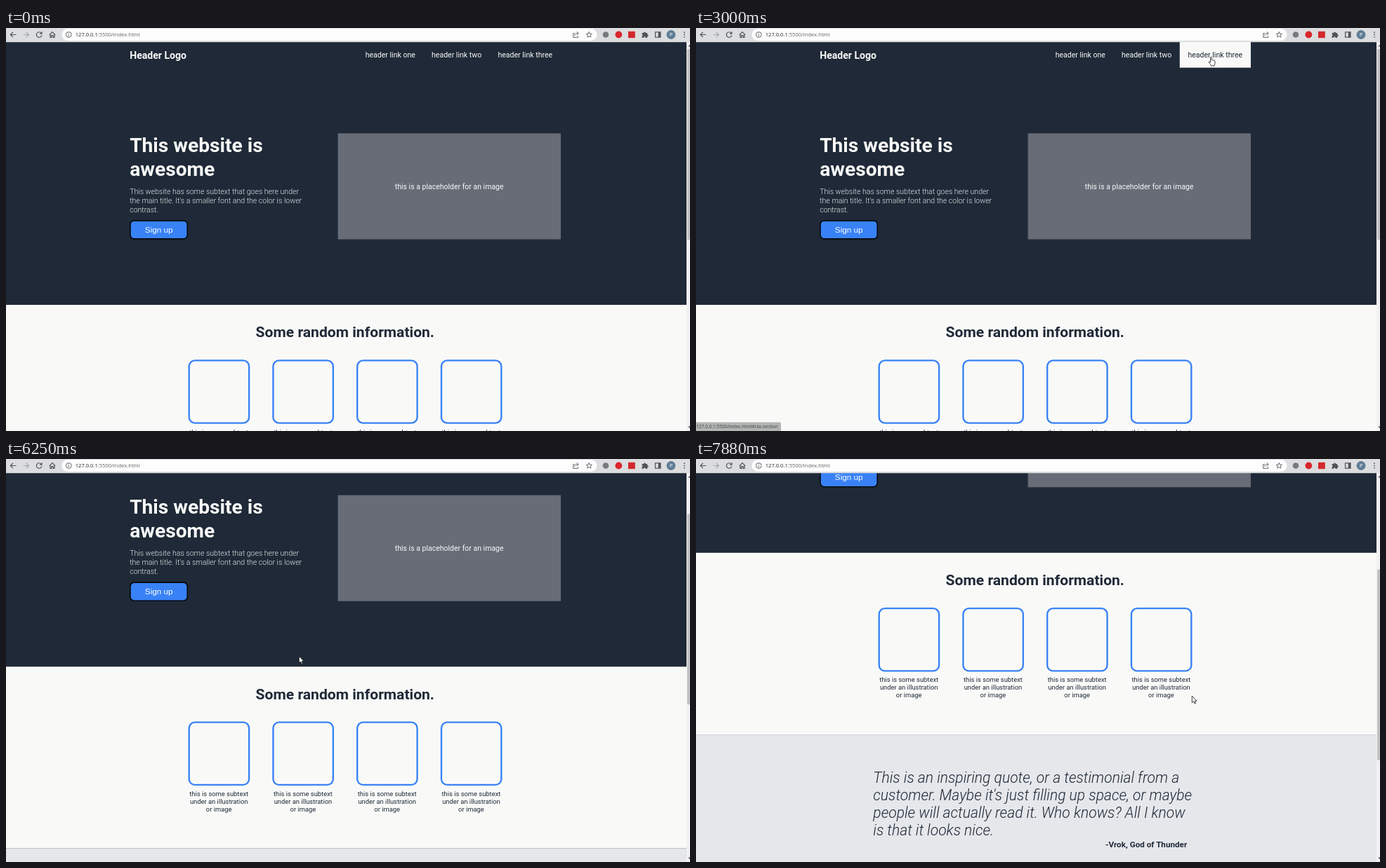
An HTML page for the animation above (8 s loop, 974x575 px).

```html
<!DOCTYPE html>
<html lang="en">
<head>
<meta charset="utf-8">
<title>Landing page demo</title>
<style>
  html, body { margin: 0; width: 100%; height: 100%; overflow: hidden; background: #1f2937; }
  svg { display: block; width: 974px; height: 575px; font-family: Roboto, sans-serif; }
  .ui { font-family: "Noto Sans", "Open Sans", sans-serif; }
  .logo { font-size: 14.07px; font-weight: 700; fill: #f9faf8; }
  .link text { font-size: 10.55px; fill: #f9faf8; }
  .link rect { fill: none; }
  .link.on text { fill: #1f2937; }
  .link.on rect { fill: #f9faf8; }
  .title { font-size: 28.15px; font-weight: 700; fill: #f9faf8; }
  .sub { font-size: 10.55px; font-weight: 300; fill: #e5e7eb; }
  .alt { font-size: 10.5px; fill: #f9faf8; text-anchor: middle; }
  .button { font: 11.72px "Liberation Sans", Arial, sans-serif; fill: #fff; text-anchor: middle; }
  .heading { font-size: 21.1px; font-weight: 700; fill: #1f2937; text-anchor: middle; }
  .caption { font-size: 9.38px; fill: #1f2937; text-anchor: middle; }
  .quote { font-size: 21.1px; font-weight: 300; font-style: italic; fill: #1f2937; }
  .author { font-size: 11.7px; font-weight: 700; fill: #1f2937; text-anchor: end; }
  .icon { fill: none; stroke: #505357; stroke-width: 1.2; }
</style>
</head>
<body>
<svg viewBox="0 0 974 575">
  <defs>
    <g id="card">
      <rect x="260.7" y="474.4" width="85.4" height="89.2" rx="8.2" fill="none" stroke="#3882f6" stroke-width="2.35"/>
      <g class="caption">
        <text x="303.2" y="579.6">this is some subtext</text>
        <text x="303.2" y="590.6">under an illustration</text>
        <text x="303.2" y="601.6">or image</text>
      </g>
    </g>
  </defs>

  <g id="page">
    <rect y="20" width="969" height="375" fill="#1f2937"/>
    <text class="logo" x="176.2" y="43.8">Header Logo</text>
    <g class="link"><rect x="500" y="20" width="94.7" height="36.6"/><text x="511.7" y="42">header link one</text></g>
    <g class="link"><rect x="594.4" y="20" width="94.6" height="36.6"/><text x="606" y="42">header link two</text></g>
    <g class="link"><rect x="688.8" y="20" width="101.2" height="36.6"/><text x="700.4" y="42">header link three</text></g>

    <g class="title"><text x="176.2" y="177.2">This website is</text><text x="176.2" y="211">awesome</text></g>
    <g class="sub">
      <text x="176.2" y="236.8">This website has some subtext that goes here under</text>
      <text x="176.2" y="249.7">the main title. It's a smaller font and the color is lower</text>
      <text x="176.2" y="262.5">contrast.</text>
    </g>
    <rect x="177" y="275" width="81.2" height="25.8" rx="5.5" fill="#3882f6" stroke="#000" stroke-width="1.4"/>
    <text class="button" x="217.7" y="291.6">Sign up</text>
    <rect x="472.6" y="150.3" width="317.4" height="151.2" fill="#676c77"/>
    <text class="alt" x="631.2" y="229.6">this is a placeholder for an image</text>

    <rect y="395" width="969" height="259.3" fill="#f9faf8"/>
    <text class="heading" x="482.8" y="441.4">Some random information.</text>
    <use href="#card"/>
    <use href="#card" x="119.75"/>
    <use href="#card" x="239.5"/>
    <use href="#card" x="359.25"/>

    <rect y="654.3" width="969" height="260" fill="#e5e7eb"/>
    <g class="quote">
      <text x="252.3" y="723.4">This is an inspiring quote, or a testimonial from a</text>
      <text x="252.3" y="748.5">customer. Maybe it's just filling up space, or maybe</text>
      <text x="252.3" y="773.6">people will actually read it. Who knows? All I know</text>
      <text x="252.3" y="798.7">is that it looks nice.</text>
    </g>
    <text class="author" x="699.2" y="815.3">-Vrok, God of Thunder</text>
  </g>

  <rect x="969" y="20" width="5" height="555" fill="#f1f1f1"/>
  <rect id="thumb" x="970" y="30" width="4" height="272" fill="#c1c1c1"/>
  <path d="M971.2 26.5L973.6 24 974 24.4V26.5ZM971.2 568.5L973.6 571 974 570.6V568.5Z" fill="#505050"/>

  <g id="status" class="ui">
    <path id="bubble" fill="#b3b4b4"/>
    <text id="address" x="0.3" y="571.2" font-size="6.5" fill="#45484b"></text>
  </g>

  <!-- browser toolbar -->
  <rect width="974" height="20.2" fill="#dcddde"/>
  <rect x="79.5" y="1" width="762" height="17" rx="8.5" fill="#fdfdfd"/>
  <text class="ui" x="98.8" y="12.4" font-size="7.55" fill="#303236">127.0.0.1<tspan fill="#6a6d71">:5500/index.html</tspan></text>
  <g class="icon">
    <path d="M14.3 9.5H6.5M10 5.8L6.3 9.5 10 13.2"/>
    <path d="M24.5 9.5H32.5M28.8 5.8L32.5 9.5 28.8 13.2" stroke="#a2a4a7"/>
    <path d="M50.2 7.2A3.8 3.8 0 1 0 50.9 10.4M51 5.2V8.2H48"/>
    <path d="M61.8 9.8L66 5.6 70.2 9.8M63 9V13.4H64.9V10.6H67.1V13.4H69V9"/>
    <g stroke-width=".9">
      <circle cx="89.3" cy="9.5" r="3.9"/>
      <path d="M89.3 8.9V11.8M89.3 7V8"/>
      <path d="M810 7.6H807.8V13.4H814.6V11.2M809.8 11C810 8.6 811.6 7.6 814 7.6M812.6 5.4L815.4 7.7 812.6 10"/>
      <path d="M830.3 5.4L831.5 8.2 834.3 8.4 832.2 10.3 832.8 13.1 830.3 11.6 827.8 13.1 828.4 10.3 826.3 8.4 829.1 8.2Z"/>
    </g>
    <rect x="924.6" y="5.8" width="7.4" height="7.4"/>
  </g>
  <circle cx="854" cy="9.5" r="4.3" fill="#77797b"/>
  <circle cx="872.4" cy="9.5" r="4.9" fill="#d8262c"/>
  <rect x="886" y="4.8" width="9.8" height="9.4" fill="#d2282d"/>
  <path d="M905.6 7H908A1.5 1.5 0 0 1 911 7H913.2V9A1.5 1.5 0 0 1 913.2 12V14H910.6A1.4 1.4 0 0 0 907.8 14H905.6V11.4A1.4 1.4 0 0 0 905.6 8.8Z" fill="#505357"/>
  <path d="M928.8 6H932V13H928.8Z" fill="#505357"/>
  <circle cx="947" cy="9.5" r="6.4" fill="#5f7d95"/>
  <text class="ui" x="947" y="12" font-size="7" text-anchor="middle" fill="#fff">P</text>
  <g fill="#505357"><circle cx="966" cy="6.2" r=".9"/><circle cx="966" cy="9.5" r=".9"/><circle cx="966" cy="12.8" r=".9"/></g>

  <g id="cursor" fill="#fff" stroke="#111" stroke-width=".8" stroke-linejoin="round">
    <path id="arrow" d="M0 0V9.8L2.3 7.8 4 11.3 5.4 10.7 3.9 7.3H6.8Z"/>
    <path id="hand" d="M3 1.4A.9.9 0 0 1 4.8 1.4V5.2C5 4.6 6.4 4.6 6.5 5.4 6.8 4.8 8 5 8.1 5.8 8.5 5.3 9.5 5.6 9.5 6.5V9.5C9.5 11 8.6 11.6 8.6 13.2H4C4 11.8 1.8 9.8.9 8.2.5 7.3 1.5 6.8 2.2 7.5L3 8.4Z"/>
  </g>
</svg>
<script>
  const LOOP = 8000;
  const sections = ['info', 'quote', 'cta'];
  const bubbleWidths = [124, 130, 121];

  // time, cursor x, cursor y, shape, hovered link, scroll
  const poses = [
    [0, 0, 0, ''],
    [200, 793, 102, 'arrow'],
    [400, 755, 118, 'arrow'],
    [600, 694, 126, 'arrow'],
    [800, 638, 121, 'arrow'],
    [1000, 595, 111, 'arrow'],
    [1200, 558, 94, 'arrow'],
    [1390, 546, 44, 'hand', 0],
    [1590, 544, 32, 'hand', 0],
    [1800, 545, 26.5, 'hand', 0],
    [1990, 570, 31, 'hand', 0],
    [2190, 610, 35, 'hand', 1],
    [2390, 637, 38, 'hand', 1],
    [2610, 666, 40, 'hand', 1],
    [2800, 706, 41, 'hand', 2],
    [3000, 729.5, 40.7, 'hand', 2],
    [3630, 733, 63, 'arrow'],
    [3840, 660, 110, 'arrow'],
    [4040, 530, 178, 'arrow'],
    [4240, 390, 240, 'arrow'],
    [4440, 285, 276, 'arrow'],
    [4650, 227, 285, 'hand'],
    [4840, 226, 284.5, 'hand'],
    [5460, 240, 284.5, 'hand'],
    [5660, 315, 284, 'arrow'],
    [5850, 390, 282, 'arrow'],
    [6050, 417.3, 281.3, 'arrow'],
    [6250, 417.3, 281.3, 'arrow', -1, 98.7],
    [6450, 417.3, 281.3, 'arrow', -1, 200],
    [6660, 417.3, 281.3, 'arrow', -1, 252.4],
    [7460, 478, 295, 'arrow', -1, 252.4],
    [7670, 640, 330, 'arrow', -1, 252.4],
    [7880, 706.3, 338, 'arrow', -1, 261.2]
  ];

  const $ = id => document.getElementById(id);
  const links = document.querySelectorAll('.link');
  const start = performance.now();
  let shown;

  function show([, x, y, shape, hover = -1, scroll = 0]) {
    $('page').setAttribute('transform', `translate(0 ${-scroll})`);
    $('thumb').setAttribute('y', 30 + scroll * 0.489);
    $('cursor').setAttribute('transform', `translate(${x} ${y})`);
    for (const id of ['arrow', 'hand']) $(id).style.display = id === shape ? '' : 'none';
    links.forEach((link, i) => link.classList.toggle('on', i === hover));
    $('status').style.display = hover < 0 ? 'none' : '';
    if (hover >= 0) {
      $('address').textContent = `127.0.0.1:5500/index.html#${sections[hover]}-section`;
      $('bubble').setAttribute('d', `M0 562.5H${bubbleWidths[hover] - 2}q2 0 2 2V575H0Z`);
    }
  }

  function tick() {
    const time = Math.max(0, performance.now() - start) % LOOP;
    const pose = poses.findLast(([t]) => t <= time);
    if (pose !== shown) show(shown = pose);
    requestAnimationFrame(tick);
  }
  tick();
</script>
</body>
</html>
```
